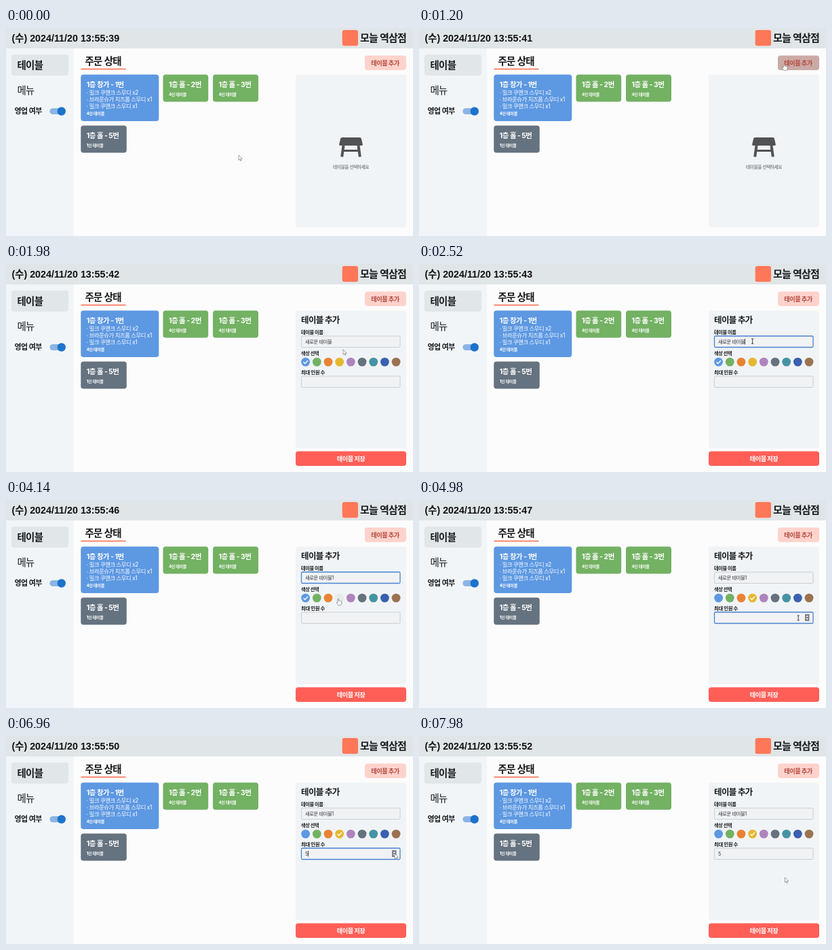
Write an HTML page that moves like this. It is 600x306 px and loops after 8 s.

```html
<!DOCTYPE html>
<html lang="ko">
<head>
<meta charset="utf-8">
<style>
html, body { margin: 0; width: 100%; height: 100%; overflow: hidden; background: #fcfcfd; }
svg { display: block; width: 100%; height: 100%; }
text { font-family: Inter, "Noto Sans CJK KR", "Noto Sans CJK", sans-serif; letter-spacing: -.05em; white-space: pre; }
#clock { font-family: "Liberation Sans", "Noto Sans CJK KR", "Noto Sans CJK", sans-serif; letter-spacing: 0; }
</style>
</head>
<body>
<svg id="stage" viewBox="0 0 600 306"></svg>
<script>
const INK = '#181a1c';
const SWATCHES = ['#5d98e2', '#73b163', '#e88433', '#e6b830', '#ae84bd', '#65727f', '#4593a3', '#3b60ae', '#9b7250'];
const YELLOW = 3;

const box = (x, y, w, h, fill, r = 4, extra = '') =>
  `<rect x="${x}" y="${y}" width="${w}" height="${h}" rx="${r}" fill="${fill}" ${extra}/>`;
const label = (x, y, size, str, weight = 700, fill = INK, extra = '') =>
  `<text x="${x}" y="${y}" font-size="${size}" font-weight="${weight}" fill="${fill}" ${extra}>${str}</text>`;
const mid = 'text-anchor="middle"';

function card(x, y, w, fill, title, seats, items = []) {
  const h = 40 + items.length * 9.5;
  return box(x, y, w, h, fill) + label(x + 8.5, y + 18, 10.5, title, 700, '#fff') +
    items.map((s, i) => label(x + 8.5, y + 29.3 + i * 10, 8.3, '· ' + s, 400, '#fff')).join('') +
    label(x + 8.5, y + h - 8.6, 6.1, seats, 700, '#fff');
}

const field = (id, y) =>
  box(435.5, y, 145.5, 16.5, '#f0f2f4', 1.5, `id="${id}"`) +
  label(441, y + 10.9, 7.2, '', 400, '#33373b', `id="${id}Text"`) +
  `<path id="${id}Caret" stroke="#222" stroke-width=".8"/>`;

const swatchX = i => 441.6 + i * 16.68;
const swatches = SWATCHES.map((c, i) =>
  `<circle id="sw${i}" cx="${swatchX(i)}" cy="144.1" r="6.4" fill="${c}"/>`).join('');

const $ = id => document.getElementById(id);
$('stage').innerHTML =
  box(0, 0, 600, 306, '#fcfcfd', 0) + box(0, 30, 100, 276, '#f1f5f7', 0) + box(0, 0, 600, 30, '#e0e5e7', 0) +
  label(8.5, 20, 14.3, '', 700, '#111', 'id="clock"') +
  box(495.7, 3, 23.3, 23.3, '#ff7759', 3) +
  label(522, 20, 15, '모늘 역삼점') +
  // sidebar
  box(8, 39, 84, 31, '#e1e6e8') + label(16.5, 59.5, 14.5, '테이블') +
  label(16.5, 97, 14.5, '메뉴', 500) + label(12.5, 126, 11, '영업 여부') +
  box(64.5, 118, 22, 9, '#8bb4e4', 4.5) + '<circle cx="81.8" cy="122.5" r="6.2" fill="#1d72cd"/>' +
  // orders
  label(116.5, 53.5, 14.5, '주문 상태', 600) + box(110.5, 59.5, 66, 1.9, '#fb8269', 0) +
  box(529, 40.5, 61, 21.5, '#ffd3cc', 4, 'id="add"') +
  label(559, 54.5, 9.2, '테이블 추가', 700, '#b4483d', mid) +
  card(110.3, 68.5, 115, SWATCHES[0], '1층 창가 - 1번', '4인 테이블',
    ['밀크 쿠앤크 스무디 x2', '브라운슈가 치즈폼 스무디 x1', '밀크 쿠앤크 스무디 x1']) +
  card(231.5, 68.5, 66.7, SWATCHES[1], '1층 홀 - 2번', '4인 테이블') +
  card(305, 68.5, 67, SWATCHES[1], '1층 홀 - 3번', '4인 테이블') +
  card(110.3, 143.5, 67.5, SWATCHES[5], '1층 홀 - 5번', '1인 테이블') +
  // right panel
  box(427, 68.5, 163, 225, '#f1f4f6', 4, 'id="panel"') +
  `<g id="empty"><path d="M495.5 161h26q1.8 0 2.3 1.6l2 8.4q.4 2-1.6 2h-31.400q-2 0-1.600-2l2-8.400q.5-1.600 2.300-1.600z" fill="#515355"/>
   <path d="M497.500 173l-2.300 16.500M519.500 173l2.300 16.500" stroke="#515355" stroke-width="4"/>
   <path d="M497 180.500h23" stroke="#515355" stroke-width="3"/>` +
  label(508.5, 206.7, 6.6, '테이블을 선택하세요', 400, '#55595d', mid) + '</g>' +
  '<g id="form">' +
  label(435, 87.3, 12.5, '테이블 추가') +
  label(435, 102.6, 7.2, '테이블 이름') + field('name', 106) +
  label(435, 134.2, 7.2, '색상 선택') + swatches +
  '<path id="check" d="M-3.2 .2l2.300 2.300 4.300-4.600" fill="none" stroke="#fff" stroke-width="1.400"/>' +
  label(435, 162, 7.4, '최대 인원 수') + field('seats', 165) +
  `<g id="spin">${box(569, 168, 6.5, 10, '#7b8086', .5)}
   <path d="M570.500 172l1.700-2.200 1.700 2.200zM570.500 174l1.700 2.200 1.700-2.200z" fill="#fff"/></g>` +
  box(427, 275.5, 163, 21.5, '#ff5f57') + label(508.5, 289.5, 9.2, '테이블 저장', 700, '#fff', mid) +
  '</g><path id="cursor" stroke-linejoin="round"/>';

const SHAPES = {
  arrow: 'M0 0V7.400L1.700 5.900 2.900 8.600 4 8.100 2.800 5.500H5.300Z',
  hand: 'M-.8 0Q0-1 .8 0V3Q1.800 2.400 2.300 3.200 3.300 2.700 3.700 3.500 5 3 5 4.400V6.500Q4.800 8.500 3.800 9.300H-.2Q-1.500 7.500-2.700 5.500-2.700 4-.8 5.300Z',
  beam: 'M-1.600-3.500H1.600M0-3.500V3.500M-1.600 3.500H1.600'
};

// [time, x, y, shape from this time on]
const PATH = [
  [0, 343, 187, 'arrow'], [690, 343, 187, 'arrow'], [1110, 538, 53, 'hand'], [1440, 538, 53, 'hand'],
  [1620, 530.500, 65, 'hand'], [1680, 527, 80, 'arrow'], [1860, 506, 143, 'arrow'], [2040, 494, 120, 'beam'],
  [2160, 491.600, 113.600, 'beam'], [3420, 491.600, 113.600, 'beam'], [3600, 565, 128, 'arrow'],
  [3780, 497, 146, 'hand'], [3840, 490, 145.500, 'hand'], [4440, 490, 145.500, 'hand'],
  [4560, 500, 162, 'arrow'], [4740, 530, 181, 'arrow'], [4860, 545, 174, 'beam'], [5100, 573, 173, 'arrow'],
  [5940, 573, 173, 'arrow'], [6300, 574, 175, 'arrow'], [6480, 573, 173, 'arrow'], [7320, 573, 173, 'arrow'],
  [7980, 539.500, 208, 'arrow']
];

const clamp = v => Math.max(0, Math.min(1, v));
const ease = v => v * v * (3 - 2 * v);
const set = (id, attrs) => { for (const k in attrs) $(id).setAttribute(k, attrs[k]); };
const show = (id, on) => $(id).style.display = on ? '' : 'none';
const between = (t, a, b) => t >= a && t < b;
const mix = (a, b, k) => `rgb(${a.map((v, i) => v + (b[i] - v) * k)})`;

function drawField(id, y, str, focus, caretX, caret) {
  $(id + 'Text').textContent = str;
  set(id, { stroke: focus ? '#4b83cf' : '#c3c7ca', 'stroke-width': focus ? 1.3 : .8 });
  set(id + 'Caret', { d: `M${caretX} ${y + 4}v8.500` });
  show(id + 'Caret', caret);
}

function drawCursor(t) {
  const i = PATH.findLastIndex(p => p[0] <= t);
  const a = PATH[i], b = PATH[i + 1] || a;
  const k = a === b ? 0 : ease((t - a[0]) / (b[0] - a[0]));
  const beam = a[3] === 'beam';
  set('cursor', {
    d: SHAPES[a[3]],
    transform: `translate(${a[1] + (b[1] - a[1]) * k} ${a[2] + (b[2] - a[2]) * k})`,
    fill: beam ? 'none' : '#fff', stroke: beam ? '#333' : '#777b80', 'stroke-width': beam ? .9 : .7
  });
}

function draw(t) {
  const sec = 39 + Math.max(0, Math.floor((t + 60) / 600));
  $('clock').textContent = `(수) 2024/11/20 13:55:${sec}`;

  const open = t >= 1380;
  show('empty', !open);
  show('form', open);
  set('panel', { height: open ? 203 : 225 });

  const hover = clamp((t - 1050) / 120) - clamp((t - 1640) / 220);
  set('add', { fill: mix([255, 211, 204], [203, 170, 165], hover) });

  const typed = t >= 3420, picked = t >= 4320;
  drawField('name', 106, '새로운 테이블' + (typed ? '1' : ''), between(t, 2340, 4320), typed ? 484 : 480.500,
    between(t, 2340, 2820) || between(t, 3180, 3780));

  const light = clamp((t - 3780) / 120) - clamp((t - 4380) / 180);
  set('sw' + YELLOW, { fill: mix([230, 184, 48], [230, 234, 235], light) });
  set('check', { transform: `translate(${swatchX(picked ? YELLOW : 0)} 144.100)` });

  const count = [5280, 5520, 5700, 6600, 6840].filter(c => t >= c).length;
  const focus = between(t, 4860, 7560);
  drawField('seats', 165, count || '', focus, count ? 445.500 : 441.500,
    focus && Math.floor((t - 5700) / 300) % 2 === 0);
  show('spin', between(t, 4800, 7440));

  drawCursor(t);
}

function tick(now) {
  draw(now % 8000);
  requestAnimationFrame(tick);
}
draw(0);
requestAnimationFrame(tick);
</script>
</body>
</html>
```
